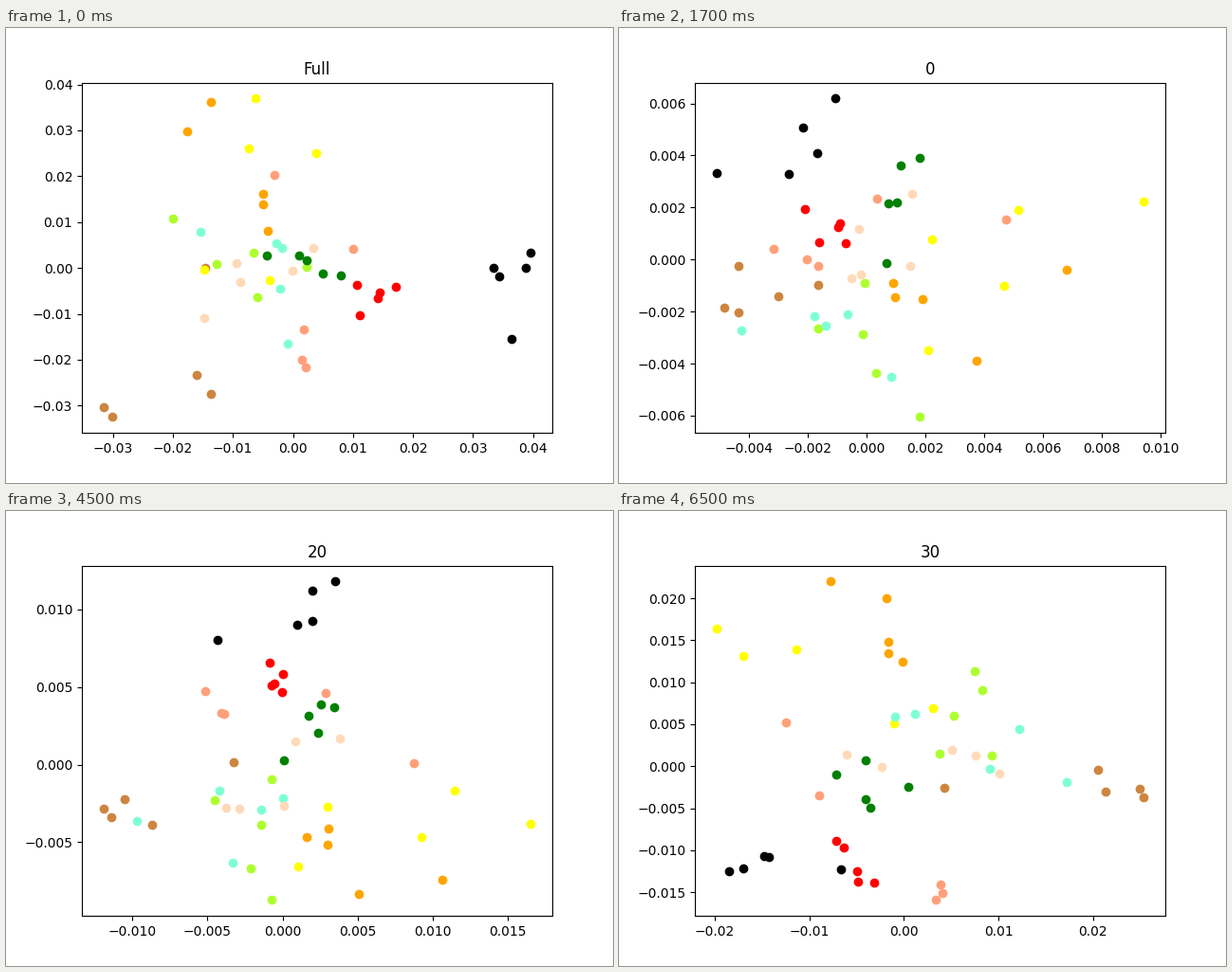
Animation of 640x480 px, one loop 8 s. Source, as a matplotlib script:

```python
import matplotlib.pyplot as plt
from matplotlib.animation import FuncAnimation

plt.rcParams["font.family"] = "DejaVu Sans"
STEP_MS = 500


def scene(title, steps, x_axis, y_axis, **groups):
    """Axes are (zero pixel, pixels per tick, first, last, tick value, decimals)."""
    return dict(title=title, steps=steps, x_axis=x_axis, y_axis=y_axis, groups=groups)


# Each group is a flat run of x, y stage pixels, measured from the top left.
SCENES = [
    scene(
        "Full", 1,
        (302.5, 63.3, -3, 4, 0.01, 2), (253.1, -48.4, -3, 4, 0.01, 2),
        peru=[103, 400, 112, 410, 201, 366, 216, 386, 210, 253],
        orange=[216, 78, 191, 109, 271, 175, 271, 186, 276, 214],
        yellow=[263, 74, 256, 127, 327, 132, 209, 255, 278, 266],
        greenyellow=[176, 201, 222, 249, 261, 237, 265, 284, 317, 252],
        green=[275, 240, 309, 240, 317, 245, 334, 259, 353, 261],
        aquamarine=[205, 215, 285, 227, 291, 232, 289, 275, 297, 333],
        peachpuff=[243, 248, 247, 268, 209, 306, 302, 256, 324, 232],
        lightsalmon=[283, 155, 366, 233, 314, 318, 312, 350, 316, 358],
        red=[370, 271, 373, 303, 392, 285, 394, 279, 411, 273],
        black=[514, 253, 520, 262, 533, 328, 548, 253, 553, 237],
    ),
    scene(
        "0", 4,
        (261.2, 62, -2, 5, 0.002, 3), (244.2, -54.9, -3, 3, 0.002, 3),
        peru=[126, 251, 111, 295, 126, 300, 168, 283, 210, 271],
        orange=[472, 255, 289, 269, 291, 284, 320, 286, 377, 351],
        yellow=[553, 183, 421, 192, 330, 223, 406, 272, 326, 340],
        greenyellow=[259, 269, 210, 317, 257, 323, 271, 364, 317, 410],
        green=[317, 137, 297, 145, 284, 185, 293, 184, 282, 248],
        aquamarine=[129, 319, 206, 304, 218, 314, 241, 302, 287, 368],
        peachpuff=[309, 175, 253, 212, 307, 251, 255, 260, 245, 264],
        lightsalmon=[272, 180, 163, 233, 198, 244, 210, 251, 408, 202],
        red=[196, 191, 233, 206, 231, 210, 211, 226, 239, 227],
        black=[228, 74, 194, 105, 209, 132, 103, 153, 179, 154],
    ),
    scene(
        "10", 4,
        (259.6, 65.2, -2, 4, 0.0025, 4), (252, -46.65, -3, 4, 0.002, 3),
        peru=[119, 275, 103, 307, 116, 314, 159, 303, 208, 275],
        orange=[466, 282, 288, 290, 295, 289, 317, 302, 368, 357],
        yellow=[553, 214, 429, 212, 328, 248, 409, 284, 317, 349],
        greenyellow=[257, 272, 203, 316, 252, 325, 260, 369, 300, 410],
        green=[312, 159, 300, 163, 284, 195, 292, 198, 274, 254],
        aquamarine=[122, 331, 200, 303, 221, 314, 243, 301, 266, 371],
        peachpuff=[313, 194, 258, 222, 297, 269, 238, 283, 242, 282],
        lightsalmon=[277, 183, 163, 230, 195, 243, 203, 248, 407, 217],
        red=[203, 185, 235, 205, 234, 207, 219, 211, 241, 220],
        black=[240, 74, 208, 99, 222, 128, 116, 156, 195, 145],
    ),
    scene(
        "20", 4,
        (291.5, 79.1, -2, 3, 0.005, 3), (267.5, -81.8, -1, 2, 0.005, 3),
        peru=[240, 265, 125, 304, 103, 314, 111, 323, 154, 331],
        orange=[460, 389, 340, 335, 317, 344, 339, 352, 372, 404],
        yellow=[473, 295, 553, 330, 438, 344, 339, 312, 308, 375],
        greenyellow=[280, 283, 220, 305, 269, 331, 258, 377, 280, 410],
        green=[332, 204, 346, 207, 319, 216, 329, 234, 293, 263],
        aquamarine=[225, 295, 138, 327, 292, 303, 269, 315, 239, 371],
        peachpuff=[352, 240, 305, 243, 232, 313, 246, 314, 293, 311],
        lightsalmon=[210, 190, 227, 213, 230, 214, 337, 192, 430, 266],
        red=[278, 160, 292, 172, 283, 182, 280, 184, 291, 191],
        black=[347, 74, 323, 84, 323, 116, 307, 120, 223, 136],
    ),
    scene(
        "30", 3,
        (300.4, 99.7, -2, 2, 0.01, 2), (269.2, -44.3, -3, 4, 0.005, 3),
        peru=[505, 273, 513, 296, 549, 293, 553, 302, 343, 292],
        orange=[223, 74, 282, 92, 284, 138, 284, 150, 299, 159],
        yellow=[103, 124, 131, 153, 187, 146, 331, 208, 290, 224],
        greenyellow=[375, 169, 383, 189, 353, 216, 338, 256, 393, 258],
        green=[260, 263, 229, 278, 305, 291, 260, 304, 265, 313],
        aquamarine=[291, 217, 312, 214, 422, 230, 391, 272, 472, 286],
        peachpuff=[240, 257, 277, 270, 351, 252, 376, 258, 401, 277],
        lightsalmon=[176, 223, 211, 300, 339, 394, 341, 403, 334, 410],
        red=[229, 348, 237, 355, 251, 380, 252, 391, 269, 392],
        black=[153, 364, 158, 365, 131, 377, 116, 380, 234, 378],
    ),
]
TIMELINE = [s for s in SCENES for _ in range(s["steps"])]

fig = plt.figure(figsize=(6.4, 4.8), dpi=100)
ax = fig.add_axes([0.125, 0.11, 0.775, 0.77])


def ticks(zero, spacing, first, last, value, decimals):
    numbers = range(first, last + 1)
    labels = [f"{n * value:.{decimals}f}".replace("-", "\u2212") for n in numbers]
    return [zero + n * spacing for n in numbers], labels


def draw(step):
    current = TIMELINE[step]
    ax.clear()
    for color, xy in current["groups"].items():
        ax.scatter(xy[::2], xy[1::2], color=color)
    ax.set_xticks(*ticks(*current["x_axis"]))
    ax.set_yticks(*ticks(*current["y_axis"]))
    ax.set_xlim(80, 576)
    ax.set_ylim(427.2, 57.6)
    ax.set_title(current["title"])
    return []


animation = FuncAnimation(fig, draw, frames=len(TIMELINE), interval=STEP_MS,
                          init_func=lambda: [], repeat=True, repeat_delay=0)
plt.show()
```
